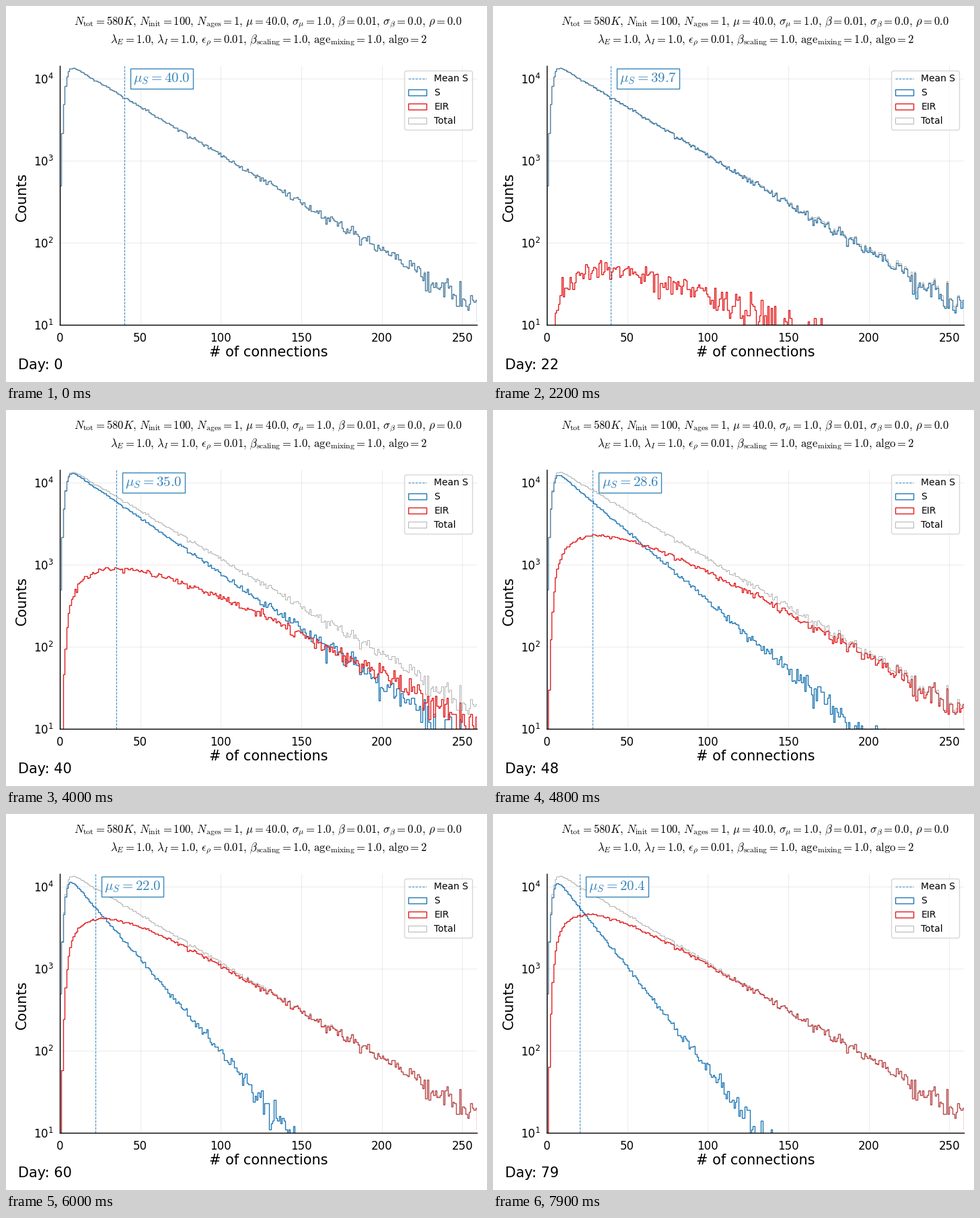
Write a matplotlib script that moves like this. It is 715 by 559 pixels and loops after 8 s.

```python
import matplotlib.pyplot as plt
import numpy as np
from matplotlib.animation import FuncAnimation
from matplotlib.patches import Patch

W, H, DPI = 715, 559, 100
DAYS = 80
BLUE, RED, GREY = "#1f77b4", "#e31a1c", "#808080"
plt.rcParams.update({"font.family": "DejaVu Sans", "mathtext.fontset": "cm"})

rng = np.random.default_rng(7)
k = np.arange(260)


def poisson_cdf(rate):
    steps = np.r_[np.exp(-rate), rate / k[1:]]
    return np.cumsum(np.cumprod(steps))


# People per number of connections: quick onset, exponential decay, count noise
onset = 0.9 * poisson_cdf(3.45) + 0.1 * poisson_cdf(6)
total = rng.poisson(17000 * onset * np.exp(-0.0268 * k))

# Each person is infected once exposure * connections passes their threshold
limits = [np.sort(rng.exponential(size=n)) for n in total]


def exposure(day):
    """Infection pressure per connection: logistic growth over the days."""
    return 0.03 / (1 + np.exp(-0.174 * (day - 50.52)))


def susceptible(day):
    a = exposure(day)
    return np.array([t.size - np.searchsorted(t, a * n) for n, t in zip(k, limits)])


def mean_s(day):
    """Mean connections of those still susceptible, 40 before any exposure."""
    a = exposure(day)
    return 1 / (1 / 40 + a * (0.88 - 2.53 * a))


fig = plt.figure(figsize=(W / DPI, H / DPI), dpi=DPI, facecolor="white")


def put(x, y, text, size, **kw):
    return fig.text(x / W, 1 - y / H, text, fontsize=size, **kw)


ax = fig.add_axes([80 / W, 1 - 474 / H, 620 / W, 385 / H])
ax.set_yscale("log")
ax.set_xlim(0, 259)
ax.set_ylim(10, 10 ** (1 + 385 / 122.1))
ax.spines[["top", "right"]].set_visible(False)
ax.spines[["left", "bottom"]].set_linewidth(1)
ax.tick_params(which="both", length=0)
ax.tick_params(axis="x", labelsize=12, pad=7.7)
ax.tick_params(axis="y", labelsize=12, pad=6.5)
ax.grid(True, which="major", color=GREY, alpha=0.15, lw=0.8)
ax.set_axisbelow(True)

edges = np.arange(k.size + 1)
styles = {
    "S": dict(edgecolor=BLUE, lw=1),
    "EIR": dict(edgecolor=RED, lw=1),
    "Total": dict(edgecolor=GREY, lw=0.6, alpha=0.7),
}
hists = {name: ax.stairs(total, edges, **style) for name, style in styles.items()}
mean_line = ax.axvline(40, color=BLUE, lw=0.7, ls="--", alpha=0.9, label="Mean S")
keys = [Patch(fill=False, label=name, **style) for name, style in styles.items()]
ax.legend(handles=[mean_line, *keys], loc="upper right", fontsize=10)

mean_label = ax.text(
    46, 10 ** (1 + 366 / 122.1), "", fontsize=15, color=BLUE, alpha=0.9,
    va="center", zorder=5,
    bbox=dict(facecolor="white", edgecolor=BLUE, alpha=0.9, lw=1, pad=3),
)

sep = r",\, "
line1 = sep.join([
    r"N_\mathrm{tot} = 580K", r"N_\mathrm{init} = 100", r"N_\mathrm{ages} = 1",
    r"\mu = 40.0", r"\sigma_\mu = 1.0", r"\beta = 0.01", r"\sigma_\beta = 0.0",
    r"\rho = 0.0",
])
line2 = sep.join([
    r"\lambda_E = 1.0", r"\lambda_I = 1.0", r"\epsilon_\rho = 0.01",
    r"\beta_\mathrm{scaling} = 1.0", r"\mathrm{age}_\mathrm{mixing} = 1.0",
    r"\mathrm{algo} = 2",
])
put(390, 29, f"${line1}$", 12, ha="center", va="baseline")
put(390.5, 55, f"${line2}$", 12, ha="center", va="baseline")
put(390, 521, "# of connections", 15, ha="center", va="baseline")
put(24, 283.5, "Counts", 15, rotation=90, ha="center", va="center")
day_label = put(17.5, 540, "", 15, va="baseline")


def draw(day):
    s = susceptible(day)
    hists["S"].set_data(s)
    hists["EIR"].set_data(total - s)
    m = mean_s(day)
    mean_line.set_xdata([m, m])
    mean_label.set_x(m + 5.5)
    mean_label.set_text(rf"$\mu_S = {m:.1f}$")
    day_label.set_text(f"Day: {day}")
    return *hists.values(), mean_line, mean_label, day_label


anim = FuncAnimation(fig, draw, frames=DAYS, interval=100, repeat=True, repeat_delay=0)
plt.show()
```
